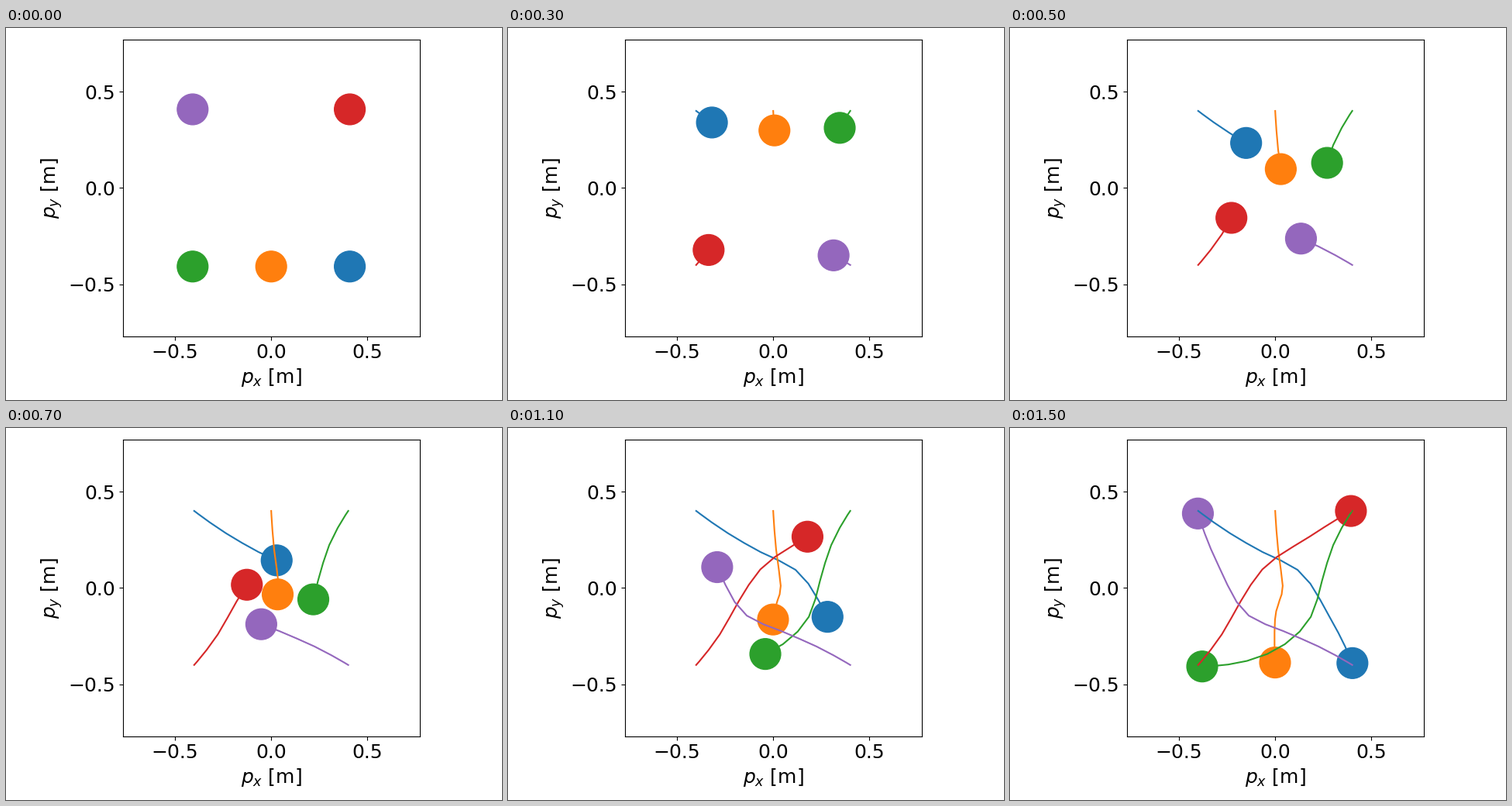
A matplotlib script for the animation above (1.6 s loop, 640x480 px).

```python
import matplotlib.pyplot as plt
import numpy as np
from matplotlib.animation import FuncAnimation
from matplotlib.patches import Circle

FRAMES, STEP_MS = 16, 100
LIMIT, RADIUS = 0.77, 0.08
OVERSHOOT = 1.02

# Each agent crosses to the point opposite its start, passing these points.
VIA_STEPS = [3, 5, 7, 10]
AGENTS = [
    ("tab:blue", (-0.4, 0.4),
     [(-0.235, 0.284), (-0.065, 0.186), (0.116, 0.094), (0.282, -0.150)]),
    ("tab:orange", (0, 0.4),
     [(0.015, 0.200), (0.039, 0.011), (0.023, -0.063), (-0.001, -0.164)]),
    ("tab:green", (0.4, 0.4),
     [(0.301, 0.222), (0.243, 0.037), (0.185, -0.150), (-0.041, -0.343)]),
    ("tab:red", (-0.4, -0.4),
     [(-0.277, -0.241), (-0.179, -0.069), (-0.067, 0.096), (0.178, 0.266)]),
    ("tab:purple", (0.4, -0.4),
     [(0.225, -0.304), (0.042, -0.224), (-0.137, -0.144), (-0.291, 0.108)]),
]


def travel():
    """Progress per step: speed up, cruise, then brake evenly."""
    middles = np.arange(FRAMES - 1) + 0.5
    speed = np.interp(middles, [0, 2, 10.6, 15.5], [0, 1, 1, 0])
    return np.concatenate([[0], np.cumsum(speed)])


def hermite(t, knots, points):
    """Cubic curve through points, with finite-difference slopes."""
    slopes = np.gradient(points, knots, axis=0, edge_order=2)
    i = np.clip(np.searchsorted(knots, t, side="right") - 1, 0, len(knots) - 2)
    h = (knots[i + 1] - knots[i])[:, None]
    u = (t - knots[i])[:, None] / h
    return ((1 + 2 * u) * (1 - u) ** 2 * points[i]
            + u * (1 - u) ** 2 * h * slopes[i]
            + u * u * (3 - 2 * u) * points[i + 1]
            + u * u * (u - 1) * h * slopes[i + 1])


def route(start, via):
    start = np.array(start)
    progress = travel()
    knots = progress[[0, *VIA_STEPS, FRAMES - 1]]
    return hermite(progress, knots, np.array([start, *via, -OVERSHOOT * start]))


fig, ax = plt.subplots(figsize=(6.4, 4.8), dpi=100, facecolor="white")
ax.set(xlim=(-LIMIT, LIMIT), ylim=(-LIMIT, LIMIT),
       xticks=[-0.5, 0, 0.5], yticks=[-0.5, 0, 0.5])
ax.set_aspect("equal")
ax.tick_params(labelsize=18)
ax.set_xlabel("$p_x$ [m]", fontsize=18)
ax.set_ylabel("$p_y$ [m]", fontsize=18)
fig.tight_layout()

routes, discs, trails = [], [], []
for color, start, via in AGENTS:
    routes.append(route(start, via))
    discs.append(ax.add_patch(Circle(start, RADIUS, color=color)))
    trails.append(ax.plot([], [], color=color)[0])


def draw(frame):
    """Show the path so far; the loop opens on the end pose without trails."""
    for path, disc, trail in zip(routes, discs, trails):
        disc.center = path[frame - 1]
        trail.set_data(path[:frame, 0], path[:frame, 1])
    return discs + trails


anim = FuncAnimation(fig, draw, frames=FRAMES, init_func=lambda: draw(0),
                     interval=STEP_MS, repeat=True, repeat_delay=0)
plt.show()
```
